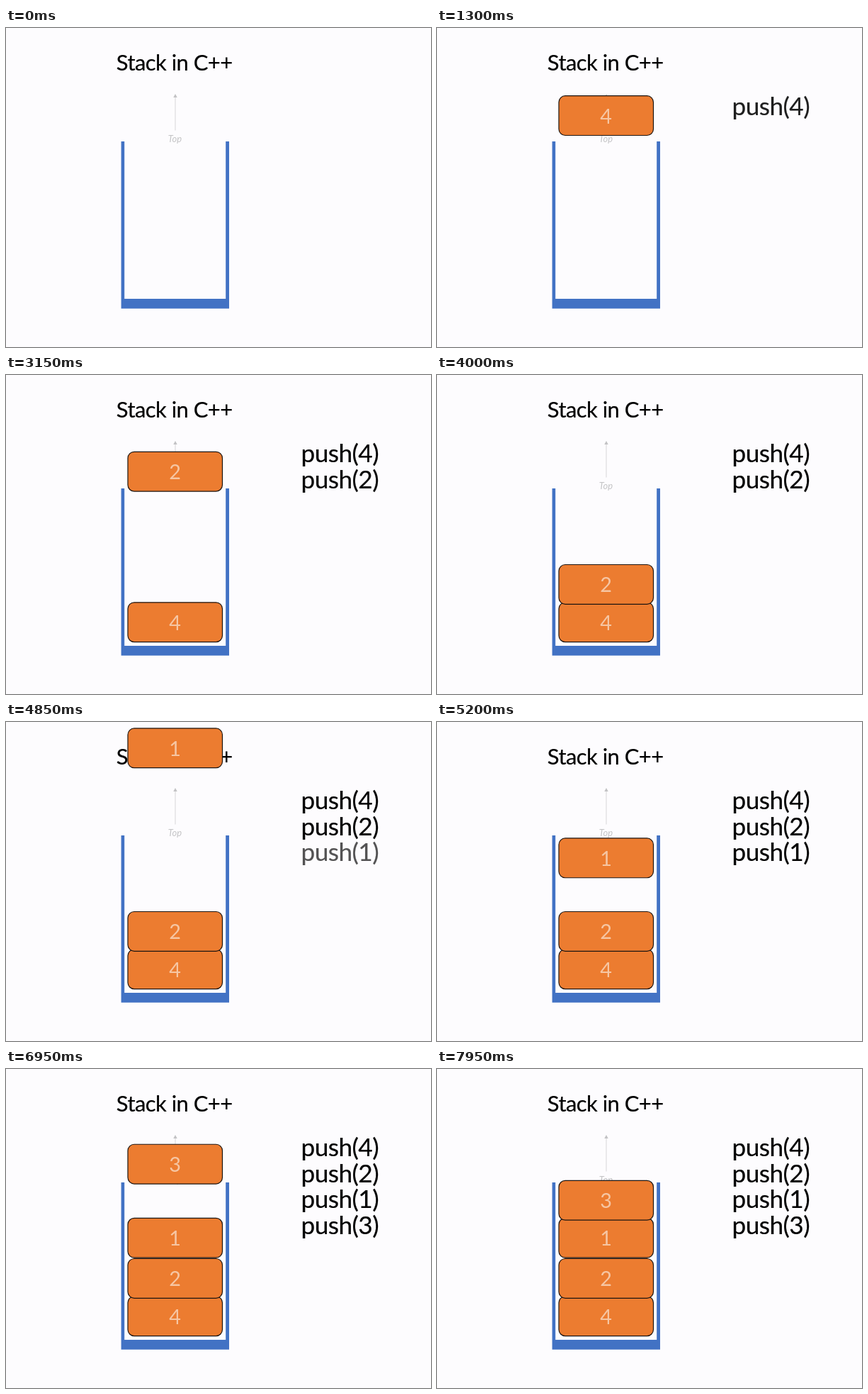
An HTML page that plays this animation: 600 px wide and 450 px high, repeating every 8 s.

```html
<!DOCTYPE html>
<html lang="en">
<head>
<meta charset="utf-8">
<title>Stack in C++</title>
<style>
  html, body { margin: 0; width: 100%; height: 100%; overflow: hidden; background: #fdfcfe; }
  svg { display: block; width: 600px; height: 450px; }
  text { font-family: Lato, "Open Sans", sans-serif; text-anchor: middle; }
  .title { font-size: 31px; letter-spacing: -.55px; stroke: #000; stroke-width: .2; }
  .call { font-size: 35.2px; letter-spacing: -.55px; stroke: #000; stroke-width: .2; }
  .top { font-size: 13px; font-style: italic; fill: #c4c4c6; }
  .box rect { fill: #ec7c30; stroke: #1c1410; stroke-width: 1.2; }
  .box text { font-size: 28.8px; fill: #f6c6a3; }
</style>
</head>
<body>
<svg id="stage" viewBox="0 0 600 450">
  <path d="M162.600 160h4.600v222h143v-222h4.800v235.800h-152.400z" fill="#4272c4"/>
  <text class="title" x="237.800" y="60.300">Stack in C++</text>
  <path d="M239 144.500V97" stroke="#cfcfd1" stroke-width=".8"/>
  <path d="M236.300 98l2.700-5 2.700 5z" fill="#c2c2c4"/>
  <text class="top" x="238.500" y="161">Top</text>
</svg>
<script>
const LOOP = 8000, STEP = 50, FADE = 500, ABOVE = -60;
const stage = document.getElementById("stage");

// Each push: value, fade start, drop start, drop length, resting top
const pushes = [
  [4, 860, 884, 920, 320.8],
  [2, 2665, 2643, 1000, 267.5],
  [1, 4515, 4493, 1000, 210.4],
  [3, 6315, 6293, 1000, 157.4]
].map(([value, fadeAt, dropAt, length, rest], i) => {
  const call = add(stage, "text", { class: "call", x: 471.3, y: 122.8 + i * 36.7 }, `push(${value})`);
  const box = add(stage, "g", { class: "box" });
  add(box, "rect", { x: 172, width: 133.5, height: 55.8, rx: 9 });
  add(box, "text", { x: 238.5, y: 38.8 }, value);
  return { call, box, fadeAt, dropAt, length, rest };
});

function add(parent, tag, attrs, text = "") {
  const el = document.createElementNS("http://www.w3.org/2000/svg", tag);
  for (const key in attrs) el.setAttribute(key, attrs[key]);
  el.textContent = text;
  return parent.appendChild(el);
}

const clamp = v => Math.min(1, Math.max(0, v));
const ease = p => p < 0.5 ? 2 * p * p : 1 - 2 * (1 - p) ** 2;

function draw(t) {
  for (const { call, box, fadeAt, dropAt, length, rest } of pushes) {
    const y = ABOVE + (rest - ABOVE) * ease(clamp((t - dropAt) / length));
    call.setAttribute("opacity", clamp((t - fadeAt) / FADE));
    box.setAttribute("transform", `translate(0 ${y.toFixed(2)})`);
  }
}

const start = performance.now();
function tick() {
  const t = (performance.now() - start) % LOOP;
  draw(Math.floor(t / STEP) * STEP);
  requestAnimationFrame(tick);
}
tick();
</script>
</body>
</html>
```
